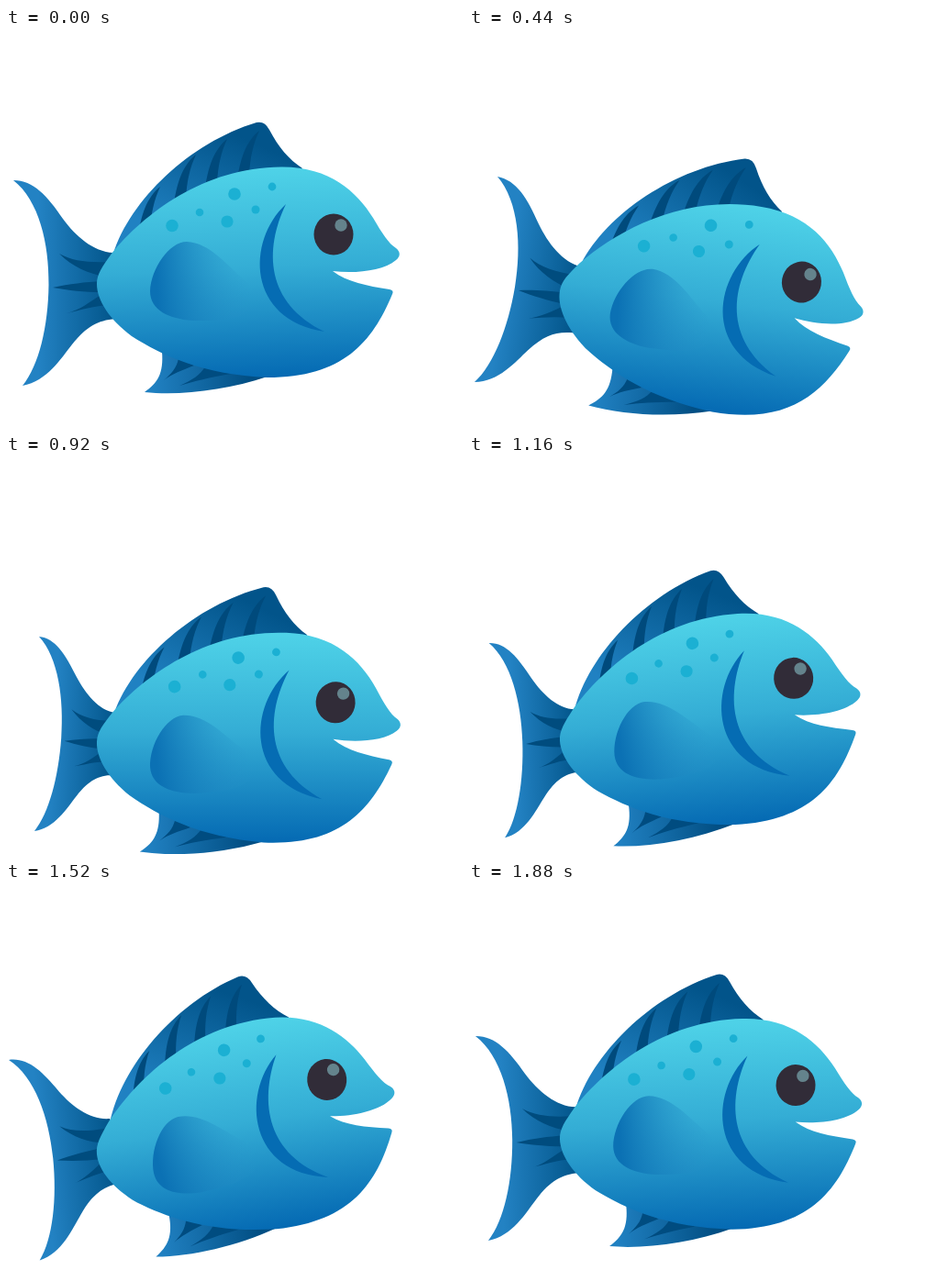
Write an HTML page that moves like this. It is 498 by 435 pixels and loops after 1920 ms.

```html
<!DOCTYPE html>
<html lang="en">
<head>
<meta charset="utf-8">
<title>Swimming fish</title>
<style>
html, body { margin: 0; width: 100%; height: 100%; overflow: hidden; background: #fff; }
svg { display: block; }
</style>
</head>
<body>
<svg width="498" height="435" viewBox="0 0 498 435">
  <defs>
    <linearGradient id="skin" gradientUnits="userSpaceOnUse" x1="255" y1="152" x2="265" y2="381">
      <stop offset="0" stop-color="#4fd3e8"/>
      <stop offset=".48" stop-color="#34add5"/>
      <stop offset="1" stop-color="#056ab3"/>
    </linearGradient>
    <linearGradient id="tailFill" gradientUnits="userSpaceOnUse" x1="35" y1="280" x2="118" y2="280">
      <stop offset="0" stop-color="#2382c3"/>
      <stop offset="1" stop-color="#02558a"/>
    </linearGradient>
    <linearGradient id="dorsalFill" gradientUnits="userSpaceOnUse" x1="180" y1="225" x2="232" y2="108">
      <stop offset="0" stop-color="#2081c2"/>
      <stop offset="1" stop-color="#02548a"/>
    </linearGradient>
    <linearGradient id="ventralFill" gradientUnits="userSpaceOnUse" x1="160" y1="385" x2="265" y2="380">
      <stop offset="0" stop-color="#2080c1"/>
      <stop offset="1" stop-color="#024f84"/>
    </linearGradient>
    <linearGradient id="sideFill" gradientUnits="userSpaceOnUse" x1="165" y1="290" x2="268" y2="284">
      <stop offset="0" stop-color="#0b71b4"/>
      <stop offset="1" stop-color="#2a97cb" stop-opacity="0"/>
    </linearGradient>
  </defs>

  <g id="tail">
    <path fill="url(#tailFill)" d="M117 245C95 244 76 227 62 208C45 183 30 166 8 166C36 188 47 235 46.500 280C46 325 36 368 18 390C45 385 60 360 72 345C88 325 100 319 119 317L135 281Z"/>
    <path fill="#004c7e" d="M58 246C72 254 90 256 112 255L108 271C90 268 72 260 58 246ZM51 283C70 279 85 277 105 276V288C85 288 68 286 51 283ZM66 311C80 308 92 298 105 290L112 302C95 303 80 308 66 311Z"/>
  </g>

  <g id="body">
    <path fill="url(#dorsalFill)" d="M117 246C135 188 200 125 273 103Q282 101 287 111C297 130 308 143 323 153L300 180L130 250Z"/>
    <g id="stripes" fill="#004a7c"></g>
    <path fill="url(#ventralFill)" d="M170 353C172 377 165 387 151 397C190 401 240 395 285 380L200 350Z"/>
    <path fill="#004c80" d="M172 384C180 377 186 371 188 360L205 368C192 373 181 377 172 384ZM189 390C203 384 212 378 217 369L245 377C222 381 205 385 189 390Z"/>
    <path fill="url(#skin)" d="M99 279C99 268 105 260 115 246C150 203 215 152 300 151.500C352 151 382 178 400 207C410 224 417 235 425 240C430 244 430 249 425 253C411 265 380 268 356 265C372 277 393 281 418 285Q423 286 421 290C399 343 367 381 285 381C215 378 170 357 137 336C113 318 99 297 99 279Z"/>
    <g id="spots" fill="#1bb0d3"></g>
    <path fill="#056cb3" d="M305 192C262 232 262 318 347 331C283 300 281 242 305 192Z"/>
    <path id="sideFin" fill="url(#sideFill)" d="M157 287C158 262 178 233 197 233C222 234 240 258 262 277C270 286 270 300 264 310C245 320 225 319 203 319C178 317 157 308 157 287Z"/>
    <ellipse cx="357" cy="225" rx="21.500" ry="22.500" fill="#312c38"/>
    <circle cx="365" cy="215" r="6.700" fill="#64838c"/>
  </g>
</svg>
<script>
const LOOP = 1920, STEP = 40;
const $ = id => document.getElementById(id);

// Key poses
const times = [0, 240, 440, 920, 1360, 1680, 1880];
const tracks = {
  drop: [0, 2, 7.5, 33.5, 26, 9, 1],
  tilt: [0, 5.5, 9.8, 2.5, -6.4, -4.5, -1],
  flap: [0, -12, -2.8, -6.5, -3.5, -9, -0.5],
  topX: [8, 60, 31, 36, 9, 1, 7],
  topY: [166, 167, 162, 198, 203, 182, 168],
  lowX: [18, 40, 6, 31, 41, 30, 21],
  lowY: [390, 370, 386, 410, 418, 404, 391]
};

// Smooth periodic curve through the key poses
function sample(values, t) {
  const n = times.length;
  const wrap = i => (i + n) % n;
  const gap = i => (times[wrap(i + 1)] - times[wrap(i)] + LOOP) % LOOP;
  const rate = i => (values[wrap(i + 1)] - values[wrap(i)]) / gap(i);
  const slope = i => (rate(i - 1) * gap(i) + rate(i) * gap(i - 1)) / (gap(i - 1) + gap(i));
  let i = n - 1;
  while (times[i] > t) i--;
  const h = gap(i), s = (t - times[i]) / h, r = 1 - s;
  return values[i] * r * r * (1 + 2 * s) + values[wrap(i + 1)] * s * s * (3 - 2 * s)
    + h * s * r * (slope(i) * r - slope(i + 1) * s);
}

// Affine map that keeps the tail root on the body and moves both tips
function tailMatrix(p, t) {
  const rootX = 115, rootY = 281;
  const y = rootY + 17 * (1 - Math.cos(2 * Math.PI * t / LOOP));
  const ux = p.topX - rootX, uy = p.topY - y;
  const vx = p.lowX - rootX, vy = p.lowY - y;
  const det = -22818;
  const a = (ux * 109 + vx * 115) / det, c = (ux * 97 - vx * 107) / det;
  const b = (uy * 109 + vy * 115) / det, d = (uy * 97 - vy * 107) / det;
  return [a, b, c, d, rootX - a * rootX - c * rootY, y - b * rootX - d * rootY];
}

$('spots').innerHTML = [
  [249, 181, 6.8], [181, 215.5, 6.8], [241, 211, 6.6],
  [211, 201, 4.3], [272, 198, 4.5], [290, 173, 4.4]
].map(([x, y, r]) => `<circle cx="${x}" cy="${y}" r="${r}"/>`).join('');

$('stripes').innerHTML = [[168, 173], [207, 138], [241, 121], [276, 112]]
  .map(([x, y]) => `<path d="M${x} ${y}c-15 12 -21 32 -24 54l13 -6c1 -18 4 -33 11 -48z"/>`).join('');

function draw(now) {
  const t = Math.floor(now % LOOP / STEP) * STEP;
  const p = {};
  for (const k in tracks) p[k] = sample(tracks[k], t);
  $('body').setAttribute('transform', `translate(0 ${p.drop}) rotate(${p.tilt} 100 279)`);
  $('sideFin').setAttribute('transform', `rotate(${p.flap} 310 285)`);
  $('tail').setAttribute('transform', `matrix(${tailMatrix(p, t)})`);
}

const start = performance.now();
function tick() {
  draw(performance.now() - start);
  requestAnimationFrame(tick);
}
tick();
</script>
</body>
</html>
```
